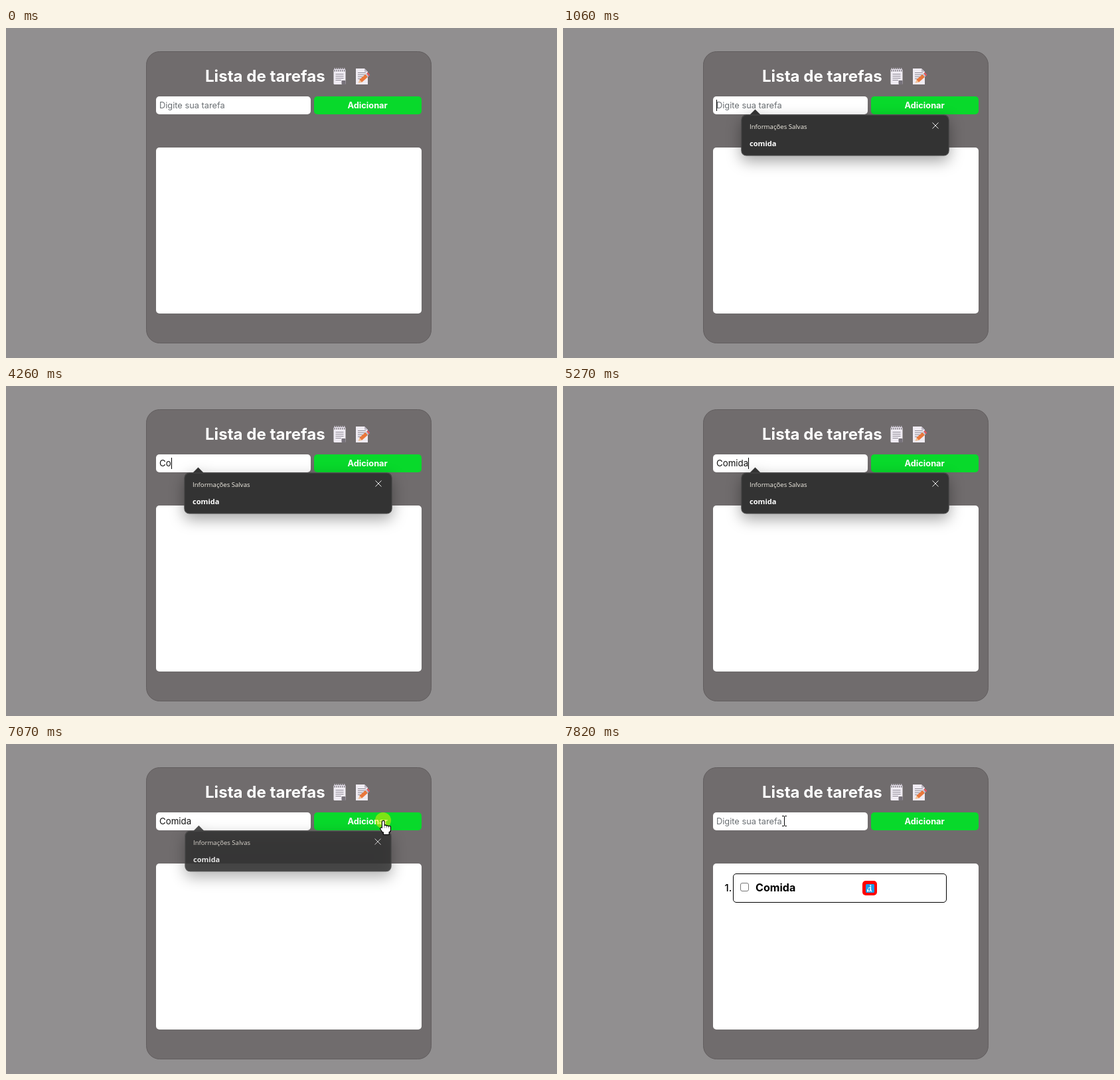
These frames come from a looping animation (830x497 px, 8 s). An HTML page with a canvas:

```html
<!DOCTYPE html>
<html lang="pt">
<head>
<meta charset="utf-8">
<title>Lista de tarefas</title>
<style>
html, body { margin: 0; width: 100%; height: 100%; overflow: hidden; background: #918f90; }
canvas { display: block; }
</style>
</head>
<body>
<canvas id="stage" width="830" height="497"></canvas>
<script>
const ctx = document.getElementById('stage').getContext('2d');
const UI = 'Inter, "Open Sans", sans-serif';
const MENU = '"Open Sans", "Noto Sans", sans-serif';

// Main moments in ms.
const LOOP = 8000, FOCUS = 850, CLICK_FIELD = 790, CLICK_ADD = 7070, ADDED = 7140;
const WORD = 'Comida', KEYS = [4000, 4260, 4330, 5140, 5205, 5270];
const BLINK = 515, CLICK_TIME = 70;

function box(x, y, w, h, r, fill, stroke) {
  ctx.beginPath();
  ctx.roundRect(x, y, w, h, r);
  paint(fill, stroke);
}

function poly(points, fill, stroke, width) {
  ctx.beginPath();
  points.forEach(([x, y]) => ctx.lineTo(x, y));
  paint(fill, stroke, width);
}

function paint(fill, stroke, width = 1) {
  if (fill) { ctx.fillStyle = fill; ctx.fill(); }
  if (stroke) { ctx.strokeStyle = stroke; ctx.lineWidth = width; ctx.stroke(); }
}

function line(x1, y1, x2, y2, color, width) {
  poly([[x1, y1], [x2, y2]], null, color, width);
}

function label(str, x, y, font, color) {
  ctx.font = font;
  ctx.fillStyle = color;
  ctx.fillText(str, x, y);
}

// Runs a drawing with its origin moved to x, y.
function at(x, y, shape, angle = 0) {
  ctx.save();
  ctx.translate(x, y);
  ctx.rotate(angle);
  shape();
  ctx.restore();
}

function rules(x, y, w) {
  for (let i = 0; i < 4; i++) line(x, y + 3 * i, x + (i < 3 ? w : w * 0.7), y + 3 * i, '#8d8894');
}

function notepad() {
  box(0, 2, 18, 23, 1.5, '#efebf2');
  rules(3, 9.5, 12);
  box(12, 19, 6, 6, 1, '#77727a');
  for (let x = 1; x < 17; x += 2.9) {
    box(x, 0, 1.5, 4.5, 0.7, '#c9c3cf');
    box(x, 3.8, 1.5, 1.4, 0.5, '#514c54');
  }
}

function memo() {
  poly([[0, 0], [13, 0], [18, 5], [18, 24], [0, 24]], '#efebf2');
  poly([[13, 0], [18, 5], [13, 5]], '#bcb5c3');
  rules(3, 6.5, 12);
  at(3.5, 22, pencil, -0.72);
}

function pencil() {
  poly([[0, 0], [5, -2.7], [5, 2.7]], '#f1c39a');
  box(5, -2.7, 12, 5.4, 0, '#e9773b');
  box(17, -2.7, 2, 5.4, 0, '#b9c4d2');
  box(19, -2.7, 2.7, 5.4, 1, '#dc5b63');
}

function page() {
  ctx.fillStyle = '#918f90';
  ctx.fillRect(0, 0, 830, 497);
  box(211.5, 35.5, 429, 439, 20, '#706c6d', '#625e5f');
  label('Lista de tarefas', 300, 81, `700 24.1px ${UI}`, '#fff');
  at(493.5, 60, notepad);
  at(527, 61, memo);
  box(226, 103, 233, 27, 5, '#fff');
  box(464, 103, 162, 27, 5, '#08d92b');
  label('Adicionar', 514.5, 121, `700 12.8px ${UI}`, '#fff');
  box(226, 180, 400, 250, 5, '#fff');
}

function field(t) {
  const pressed = KEYS.filter(k => t >= k);
  const str = t < ADDED ? WORD.slice(0, pressed.length) : '';
  const font = `400 13.3px ${UI}`;
  if (str) label(str, 231, 121, font, '#111');
  else label('Digite sua tarefa', 231, 121, `400 12.8px ${UI}`, '#6a6f73');

  // The caret restarts its blink at every key press.
  const since = t - (t >= ADDED ? ADDED : Math.max(FOCUS, ...pressed));
  const focused = t >= FOCUS && (t < CLICK_ADD || t >= ADDED);
  if (focused && Math.floor(since / BLINK) % 2 === 0) {
    ctx.font = font;
    ctx.fillStyle = '#000';
    ctx.fillRect(Math.round(231 + ctx.measureText(str).width), 108, 1, 17);
  }
}

function task() {
  label('1.', 243.5, 222, `500 15px ${UI}`, '#000');
  box(256.5, 195.5, 321, 43, 4.5, '#fff', '#000');
  box(267.5, 209.5, 12, 12, 2.5, '#fff', '#767676');
  label(WORD, 290, 222, `700 16.1px ${UI}`, '#000');
  box(451, 206, 22, 22, 5, '#f00');
  at(456, 211, bin);
}

function bin() {
  box(0, 0, 13, 13, 1.5, '#1b9cec');
  box(6.2, 1.3, 2.2, 2.2, 1.1, '#fff');
  box(2, 8, 2.4, 3.5, 0, '#fff');
  line(7.3, 4, 7.3, 8, '#fff', 1.6);
  line(7, 5, 3, 6.5, '#fff');
  line(7.3, 8, 9, 11.5, '#fff', 1.3);
  line(7.3, 8, 5.7, 11.5, '#fff', 1.3);
}

function popupAlpha(t) {
  if (t < CLICK_ADD) return Math.min(1, Math.floor((t - CLICK_FIELD) / 67.5) / 4);
  return 0.86 - 0.355 * Math.floor((t - CLICK_ADD) / 67);
}

function popup(t) {
  const alpha = popupAlpha(t);
  if (alpha <= 0) return;
  const scale = 1 - 0.048 * (1 - alpha);
  ctx.save();
  ctx.globalAlpha = alpha;
  ctx.translate(425, 162);
  ctx.scale(scale, scale);
  ctx.translate(-425, -162);

  ctx.save();
  ctx.shadowColor = 'rgba(0,0,0,.36)';
  ctx.shadowBlur = 22;
  ctx.shadowOffsetY = 8;
  ctx.beginPath();
  ctx.roundRect(268.3, 130.5, 313.4, 62, 8);
  ctx.moveTo(281, 131);
  ctx.lineTo(289.5, 122.5);
  ctx.lineTo(298, 131);
  paint('#333');
  ctx.restore();

  box(268.8, 131, 312.4, 61, 8, null, 'rgba(255,255,255,.12)');
  label('Informações Salvas', 281, 152, `400 9.65px ${MENU}`, '#f4f0e6');
  label('comida', 281, 178, `700 11.1px ${MENU}`, '#fff');
  line(556.5, 142.5, 565.5, 151.5, '#eee');
  line(565.5, 142.5, 556.5, 151.5, '#eee');
  ctx.restore();
}

// Eased travel from a to b, held still between n evenly spaced positions.
function glide(t, t0, t1, n, a, b, dip = 0) {
  const u = Math.min(1, Math.floor((t - t0) / (t1 - t0) * (n - 1) + 0.001) / (n - 1));
  const e = u * u * (3 - 2 * u);
  return [a[0] + (b[0] - a[0]) * e, a[1] + (b[1] - a[1]) * e + dip * Math.sin(Math.PI * u)];
}

function pointer(t) {
  const input = [404, 117], button = [568, 115];
  if (t < 110 || (t >= 1060 && t < 6330)) return null;
  if (t < 930) return glide(t, 110, 590, 8, [731, 413], input);
  if (t < 1060) return glide(t, 860, 990, 3, input, [643, 122]);
  if (t < 7400) return glide(t, 6330, 6870, 7, [796, 82], button);
  return glide(t, 7400, 7820, 7, button, [333, 116], 4);
}

function hand() {
  // Outline first, then the same parts in white on top.
  for (const [grow, color] of [[0.6, '#000'], [-0.5, '#fff']]) {
    const part = (x, y, w, h, r) => box(x - grow, y - grow, w + 2 * grow, h + 2 * grow, r, color);
    part(-1.5, 0.5, 3.6, 15, 1.8);
    for (let i = 1; i < 4; i++) part(-1.5 + 3.1 * i, 6.5 + 0.7 * i, 3.6, 8, 1.8);
    at(-4, 11.5, () => part(-1, 0, 3.4, 8, 1.7), -0.6);
    part(-1.5, 11, 12.4, 7, 2.5);
    part(0.5, 16, 8.5, 5.5, 0.5);
  }
}

function arrow() {
  poly([[0.5, 0.5], [0.5, 16], [4, 12.8], [6.5, 18.3], [9, 17.2], [6.5, 11.8], [11.3, 11.6], [0.5, 0.5]],
    '#fff', '#000');
}

function beam() {
  line(0.5, -7, 0.5, 7, '#000');
  for (const y of [-7.5, 7.5]) {
    line(-3, y, 0, y, '#000');
    line(1, y, 4, y, '#000');
  }
}

function mouse(t) {
  const spot = pointer(t);
  if (!spot) return;
  const [x, y] = spot;
  if ([CLICK_FIELD, CLICK_ADD].some(c => t >= c && t < c + CLICK_TIME)) {
    box(x - 12, y - 12, 24, 24, 12, 'rgba(240,240,0,.5)');
  }
  const over = (left, right) => y >= 103 && y <= 130 && x >= left && x <= right;
  const shape = over(226, 459) ? beam : over(464, 626) ? hand : arrow;
  at(Math.round(x), Math.round(y), shape);
}

function draw(t) {
  page();
  field(t);
  if (t >= ADDED) task();
  popup(t);
  mouse(t);
}

const start = performance.now();
function tick() {
  draw((performance.now() - start) % LOOP);
  requestAnimationFrame(tick);
}
tick();
</script>
</body>
</html>
```
